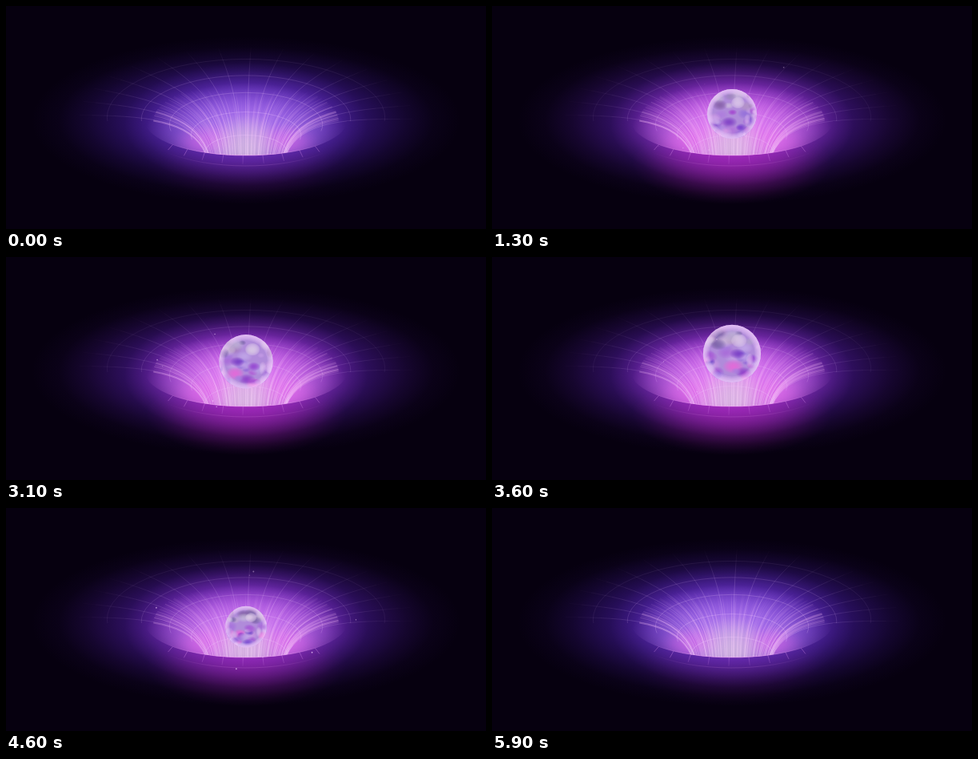
Recreate the animation shown at these times as an HTML page with a canvas. Size 600 px wide and 279 px high, loop 6000 ms.

```html
<!DOCTYPE html>
<html lang="en">
<head>
<meta charset="utf-8">
<title>Gravity well</title>
<style>
  html, body { margin: 0; width: 100%; height: 100%; overflow: hidden; background: #06000f; }
  canvas { display: block; }
</style>
</head>
<body>
<canvas id="stage" width="600" height="279"></canvas>
<script>
const ctx = document.getElementById('stage').getContext('2d');
const W = 600, H = 279, CX = 300, TAU = Math.PI * 2;
const LIP = { y: 144, rx: 126, ry: 43 };
const RINGS = 6, SPOKES = 32;

const noise = n => { const x = Math.sin(n * 127.1 + 3.7) * 43758.5453; return x - Math.floor(x); };
const mix = (a, b, k) => a + (b - a) * k;
const smooth = (a, b, x) => { const k = Math.min(1, Math.max(0, (x - a) / (b - a))); return k * k * (3 - 2 * k); };
const hsla = (h, s, l, a) => `hsla(${h},${s}%,${l}%,${a})`;

// Soft ellipse whose opacity falls off as (1 - d²)^power
function glow(x, y, rx, ry, [h, s, l], alpha, power = 2) {
  const g = ctx.createRadialGradient(0, 0, 0, 0, 0, 1);
  for (let k = 0; k <= 1; k += .125) g.addColorStop(k, hsla(h, s, l, alpha * (1 - k * k) ** power));
  ctx.save();
  ctx.translate(x, y);
  ctx.scale(rx, ry);
  ctx.fillStyle = g;
  ctx.beginPath();
  ctx.arc(0, 0, 1, 0, TAU);
  ctx.fill();
  ctx.restore();
}

function clipAboveLip() {
  ctx.beginPath();
  ctx.ellipse(CX, LIP.y, LIP.rx, LIP.ry, 0, 0, Math.PI);
  ctx.lineTo(0, LIP.y);
  ctx.lineTo(0, 0);
  ctx.lineTo(W, 0);
  ctx.lineTo(W, LIP.y);
  ctx.clip();
}

// Funnel profile: v runs from 1 at the outer plane to 0 at the throat
const radius = v => 44 + 180 * v ** 1.8;
const depth = v => 139 + 76 * (1 - v) ** 3;
const surface = (v, angle) => [
  CX + radius(v) * Math.cos(angle),
  depth(v) + .42 * radius(v) * Math.sin(angle)
];

function background(warm) {
  ctx.fillStyle = '#06000f';
  ctx.fillRect(0, 0, W, H);
  glow(CX, 143, 268, 105, [mix(259, 264, warm), 70, 43], .95);
  glow(CX, 148, 152, 77, [mix(264, 286, warm), 75, 58], mix(.7, .85, warm), 1.5);
  glow(CX, 196, 125, 52, [300, 70, 45], .12 + .3 * warm, 1.5);
}

function well(t, warm) {
  ctx.save();
  clipAboveLip();
  glow(CX, 158, 126, 62, [mix(270, 292, warm), 86, 76], mix(.72, .85, warm), 1.3);
  for (const side of [-1, 1]) glow(CX + side * 48, 170, 48, 26, [298, 78, 67], .5);
  glow(CX, 178, 46, 46, [286, 30, 82], .75, 1.5);

  const rays = 64;
  for (let i = 0; i < rays; i++) {
    const angle = Math.PI * (1 + (i + noise(i)) / rays);
    const pulse = .5 + .5 * Math.sin(TAU * (t / 6 * (1 + i % 3) + noise(i + 50)));
    const alpha = mix(.1, .5, noise(i + 90) * mix(.5, 1, pulse));
    const g = ctx.createLinearGradient(0, 104, 0, 187);
    g.addColorStop(0, hsla(305, 100, 88, 0));
    g.addColorStop(.6, hsla(305, 100, 88, alpha));
    g.addColorStop(1, hsla(300, 80, 94, alpha));
    ctx.strokeStyle = g;
    ctx.lineWidth = mix(.7, 3, noise(i + 130) ** 3);
    ctx.beginPath();
    for (let v = .6; v > 0; v -= .05) ctx.lineTo(...surface(v, angle));
    ctx.stroke();
  }
  ctx.restore();
}

function mesh(warm) {
  const lineAlpha = v => mix(.62, .5, warm) * (1 - v);
  ctx.save();
  clipAboveLip();
  ctx.lineWidth = .7;
  for (let n = 1; n < RINGS; n++) {
    const v = 1 - n / RINGS;
    ctx.strokeStyle = hsla(285, 85, 87, lineAlpha(v));
    ctx.beginPath();
    ctx.ellipse(CX, depth(v), radius(v), radius(v) * .42, 0, Math.PI - .2, TAU + .2);
    ctx.stroke();
  }
  for (let i = 0; i <= SPOKES / 2; i++) {
    const angle = Math.PI + (i + .15) / SPOKES * TAU;
    for (let v = 1; v > .04; v -= .05) {
      ctx.strokeStyle = hsla(285, 85, 88, lineAlpha(v));
      ctx.beginPath();
      ctx.moveTo(...surface(v, angle));
      ctx.lineTo(...surface(v - .05, angle));
      ctx.stroke();
    }
  }
  ctx.restore();

  // Near side of the funnel, below the lip
  const fade = ctx.createLinearGradient(0, 184, 0, 204);
  fade.addColorStop(0, hsla(290, 75, 76, .35));
  fade.addColorStop(1, hsla(290, 75, 76, 0));
  ctx.strokeStyle = fade;
  for (let i = -4; i <= 4; i++) {
    const angle = Math.PI / 2 + (i + .15) / SPOKES * TAU;
    ctx.beginPath();
    ctx.moveTo(CX + LIP.rx * Math.cos(angle), LIP.y + LIP.ry * Math.sin(angle));
    ctx.lineTo(...surface(.68, angle));
    ctx.stroke();
  }
  const edge = ctx.createLinearGradient(CX - 100, 0, CX + 100, 0);
  for (let k = 0; k <= 1; k += .125) edge.addColorStop(k, hsla(300, 85, 82, .6 * Math.sin(k * Math.PI)));
  ctx.strokeStyle = edge;
  ctx.lineWidth = 1;
  for (const v of [0, 13]) {
    ctx.globalAlpha = v ? .25 : 1;
    ctx.beginPath();
    ctx.ellipse(CX, LIP.y, LIP.rx + v, LIP.ry + v, 0, .5, Math.PI - .5);
    ctx.stroke();
  }
  ctx.globalAlpha = 1;
}

function orb(t) {
  const out = smooth(.5, 1.2, t) * (1 - smooth(4.3, 4.95, t));
  if (!out) return;
  const swell = smooth(2.2, 4.2, t);
  const y = mix(195, 135 - 23 * swell * swell, out);
  const r = (31 + 6.5 * swell) * mix(.3, 1, out);

  ctx.save();
  clipAboveLip();
  ctx.globalAlpha = Math.min(1, out * 4);
  ctx.translate(CX, y);
  ctx.scale(r, r);
  ctx.beginPath();
  ctx.arc(0, 0, 1, 0, TAU);
  ctx.clip();
  ctx.fillStyle = hsla(268, 52, 70, 1);
  ctx.fillRect(-1, -1, 2, 2);

  // Clouds drift around the sphere
  for (let i = 0; i < 110; i++) {
    const spin = TAU * (noise(i + 200) + t / 6);
    const facing = Math.cos(spin);
    if (facing < 0) continue;
    const cy = mix(-.8, .9, noise(i + 300));
    const cx = Math.sin(spin) * Math.sqrt(1 - cy * cy);
    const size = mix(.12, .34, noise(i + 400));
    const pink = cy > .3 && i % 5 === 0;
    const color = pink ? [310, 82, 66] : [mix(256, 284, noise(i + 500)), cy < -.3 ? 28 : 60, mix(46, 82, noise(i + 600))];
    glow(cx, cy, size * (.35 + .8 * facing), size * .75, color, .75, 1.2);
  }

  // Glass rim and reflections
  glow(.24, -.45, .28, .24, [280, 40, 87], .75, .6);
  glow(.62, .25, .14, .26, [295, 70, 90], .5, 1);
  for (let k = 1; k <= 6; k++) {
    ctx.strokeStyle = hsla(292, 85, 90, .16);
    ctx.lineWidth = k * .07;
    ctx.beginPath();
    ctx.arc(0, 0, 1, 0, TAU);
    ctx.stroke();
  }
  ctx.restore();
}

// Sparks drift inwards along the surface
function sparks(t) {
  for (let i = 0; i < 24; i++) {
    const k = (t - mix(.4, 4.6, noise(i + 700))) / 1.1;
    if (k <= 0 || k >= 1) continue;
    const angle = TAU * noise(i + 800) + k * .35;
    const reach = mix(1, .6, k * k) * mix(90, 155, noise(i + 900));
    ctx.fillStyle = hsla(290, 90, 92, Math.sin(k * Math.PI) * mix(.4, .95, noise(i + 950)));
    ctx.beginPath();
    ctx.arc(CX + Math.cos(angle) * reach, 139 + Math.sin(angle) * reach * .45, mix(.5, 1, noise(i + 990)), 0, TAU);
    ctx.fill();
  }
}

function frame(now) {
  const t = Math.floor(now % 6000 / 100) / 10;
  const warm = smooth(.3, 1.2, t) * (1 - smooth(4.3, 5.1, t));
  background(warm);
  well(t, warm);
  mesh(warm);
  orb(t);
  sparks(t);
  requestAnimationFrame(frame);
}
requestAnimationFrame(frame);
</script>
</body>
</html>
```
